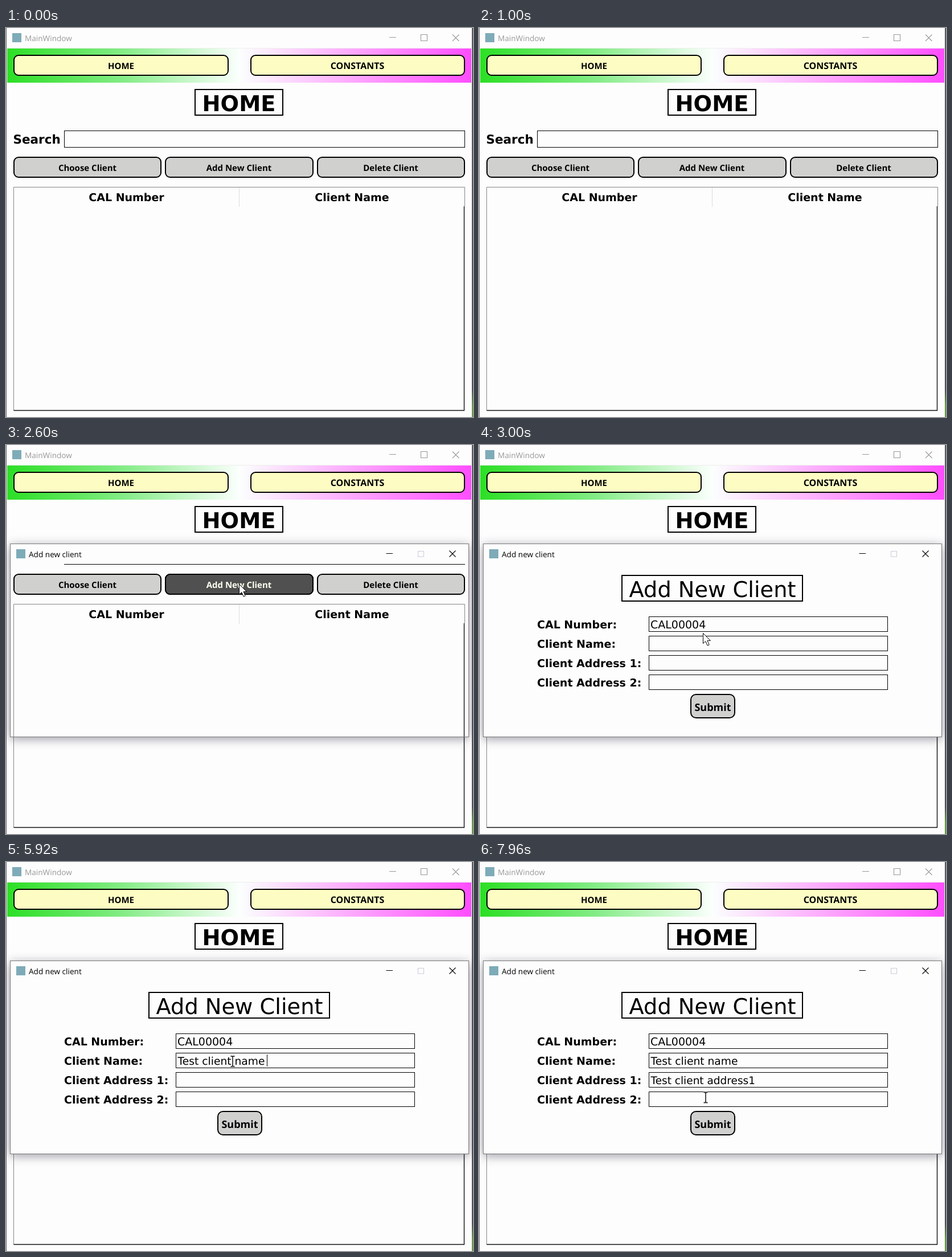
Recreate the animation shown at these times as an HTML page. Size 820 px wide and 683 px high, loop 8000 ms.

```html
<!DOCTYPE html>
<html lang="en">
<head>
<meta charset="utf-8">
<title>Add new client</title>
<style>
html, body { margin: 0; width: 100%; height: 100%; overflow: hidden; background: #fdfdfd; }
svg { display: block; width: 820px; height: 683px; }
text { font-family: "DejaVu Sans", Verdana, sans-serif; text-rendering: geometricPrecision; white-space: pre; }
.mid { text-anchor: middle; }
.title { font: 13.6px "Open Sans", sans-serif; }
.h1 { font-size: 38.3px; }
.bold { font-weight: 700; font-size: 19px; }
.value { font-size: 18.7px; }
.hand { font: 700 15px "Noto Sans", "Open Sans", sans-serif; text-anchor: middle; }
.box { fill: none; stroke: #000; }
.thick { stroke: #000; stroke-width: 2; }
.nav { fill: #fcfcc3; }
.grey { fill: #d0d0cf; }
.line { fill: none; stroke-width: 1.1; }

/* timed parts share one 8 s loop */
.t { animation: 8s step-end infinite; }
.hover { animation-name: hover; }
.dialog { animation-name: dialog; animation-timing-function: ease-out; transform-origin: 410px 343px; }
.form { animation-name: form; }
.name { animation-name: name; }
.addr { animation-name: addr; }
.arrow { animation-name: arrow; }
.beam { animation-name: beam; }
.arrow-path { animation-name: arrow-path; animation-timing-function: ease-in-out; }
.beam-path { animation-name: beam-path; animation-timing-function: ease-in-out; }
.caret { stroke: #000; animation-name: var(--k); }

@keyframes hover { 0% { opacity: 0 } 29.5%, 100% { opacity: 1 } }
@keyframes dialog {
  0%, 30.5% { opacity: 0; transform: scale(.93) }
  32.4%, 100% { opacity: 1; transform: none }
}
@keyframes form { 0% { opacity: 0 } 33%, 100% { opacity: 1 } }
@keyframes name { 0% { opacity: 0 } 73%, 100% { opacity: 1 } }
@keyframes addr { 0% { opacity: 0 } 90%, 100% { opacity: 1 } }
@keyframes arrow { 0% { opacity: 0 } 27.5% { opacity: 1 } 65%, 100% { opacity: 0 } }
@keyframes beam { 0% { opacity: 0 } 65%, 100% { opacity: 1 } }
@keyframes arrow-path {
  0%, 27.3% { transform: translate(436px, 690px) }
  30%, 36.3% { transform: translate(409px, 244px) }
  37.5%, 63% { transform: translate(393px, 330px) }
  65%, 100% { transform: translate(396px, 336px) }
}
@keyframes beam-path {
  0%, 65% { transform: translate(398px, 341px) }
  69%, 76.3% { transform: translate(398px, 350px) }
  85.5%, 92.5% { transform: translate(398px, 386.5px) }
  97.5% { transform: translate(398px, 406.5px) }
  99.5%, 100% { transform: translate(398px, 413.5px) }
}
@keyframes name-start { 0% { opacity: 0 } 71.5% { opacity: 1 } 73%, 100% { opacity: 0 } }
@keyframes name-end { 0% { opacity: 0 } 73% { opacity: 1 } 80%, 100% { opacity: 0 } }
@keyframes addr-start { 0% { opacity: 0 } 88% { opacity: 1 } 90%, 100% { opacity: 0 } }
@keyframes addr-end { 0% { opacity: 0 } 90% { opacity: 1 } 96.5%, 100% { opacity: 0 } }
</style>
</head>
<body>
<svg viewBox="0 0 820 683" xmlns="http://www.w3.org/2000/svg">
  <defs>
    <linearGradient id="bar">
      <stop offset="0" stop-color="#2cdf25"/>
      <stop offset=".25" stop-color="#84ec86"/>
      <stop offset=".5" stop-color="#fbfffd"/>
      <stop offset="1" stop-color="#ff4dff"/>
    </linearGradient>
    <linearGradient id="edge" x2="0" y2="1">
      <stop offset="0" stop-color="#55555c"/>
      <stop offset=".93" stop-color="#4a4a55"/>
      <stop offset=".97" stop-color="#5f9a35"/>
    </linearGradient>
    <filter id="blur" x="-10%" y="-15%" width="120%" height="130%"><feGaussianBlur stdDeviation="9"/></filter>
    <clipPath id="outside"><path clip-rule="evenodd" d="M0 0H820V683H0ZM7 173V512H813V173Z"/></clipPath>
  </defs>

  <!-- main window -->
  <rect width="820" height="683" fill="#fdfdfd"/>
  <rect y="36" x="2" width="815" height="60" fill="url(#bar)"/>
  <path d="M1 35.5H818" stroke="#eee"/>
  <rect width="1" height="683" fill="#66666c"/>
  <rect x="818" width="2" height="683" fill="url(#edge)"/>
  <rect x="11" y="9" width="16" height="16" fill="#7eabb8"/>
  <text class="title" x="33" y="22.5" fill="#999">MainWindow</text>
  <path class="line" stroke="#999" d="M673 16.5H685M728.5 11.5h11v11h-11ZM784 11.5l11.5 11.5M795.5 11.5L784 23"/>

  <g class="thick nav">
    <rect x="14" y="48" width="376" height="35" rx="8"/>
    <rect x="430" y="48" width="375" height="35" rx="8"/>
  </g>
  <text class="hand" x="202" y="71.5">HOME</text>
  <text class="hand" x="617" y="71.5" style="font-size:16px">CONSTANTS</text>

  <rect class="thick" x="332" y="108" width="154" height="45" fill="none"/>
  <text class="h1 mid" x="409" y="146" font-weight="700">HOME</text>

  <text class="bold" x="12.5" y="203" style="font-size:21.5px">Search</text>
  <rect class="box" x="102.5" y="180.5" width="703" height="29"/>

  <g class="thick grey">
    <rect x="14" y="227" width="258" height="35" rx="8"/>
    <rect x="280" y="227" width="259" height="35" rx="8"/>
    <rect x="547" y="227" width="258" height="35" rx="8"/>
  </g>
  <text class="hand" x="143" y="250.5">Choose Client</text>
  <text class="hand" x="409" y="250.5">Add New Client</text>
  <text class="hand" x="675.5" y="250.5">Delete Client</text>
  <g class="t hover">
    <rect class="thick" x="280" y="227" width="259" height="35" rx="8" fill="#505050"/>
    <text class="hand" x="409" y="250.5" fill="#fffff0">Add New Client</text>
  </g>

  <path d="M13.5 671.5V279.5H805.5V313" fill="none" stroke="#858585"/>
  <path d="M409.5 280V314" stroke="#dcdce2"/>
  <path d="M804.5 313V671.5H13.5" fill="none" stroke="#111" stroke-width="1.4"/>
  <text class="bold mid" x="211.5" y="304">CAL Number</text>
  <text class="bold mid" x="607.5" y="304">Client Name</text>

  <!-- dialog: its client area stays see-through until the form is painted -->
  <g class="t dialog">
    <g clip-path="url(#outside)">
      <rect x="7" y="177" width="806" height="339" fill="#34344a" opacity=".5" filter="url(#blur)"/>
    </g>
    <rect x="8" y="174" width="804" height="35" fill="#fdfdfd"/>
    <rect class="t form" x="8" y="208" width="804" height="304" fill="#fdfdfd"/>
    <rect x="7.5" y="173.5" width="805" height="339" fill="none" stroke="#777"/>
    <rect x="18" y="183" width="16" height="16" fill="#7eabb8"/>
    <text class="title" x="40" y="196.5">Add new client</text>
    <path class="line" stroke="#000" d="M667.5 190.5H679M778.5 185.5l11 11M789.5 185.5l-11 11"/>
    <path class="line" stroke="#ccd" d="M723.5 186.5h10v9.5h-10Z"/>

    <g class="t form">
      <rect class="thick" x="251" y="229" width="317" height="45" fill="none"/>
      <text class="h1 mid" x="410" y="267">Add New Client</text>
      <text class="bold" x="102" y="322">CAL Number:</text>
      <text class="bold" x="102" y="356">Client Name:</text>
      <text class="bold" x="102" y="390">Client Address 1:</text>
      <text class="bold" x="102" y="424">Client Address 2:</text>
      <g class="box">
        <rect x="298.5" y="301.5" width="419" height="26"/>
        <rect x="298.5" y="335.5" width="419" height="26"/>
        <rect x="298.5" y="369.5" width="419" height="26"/>
        <rect x="298.5" y="403.5" width="419" height="26"/>
      </g>
      <text class="value" x="301" y="322" style="font-size:19px">CAL00004</text>
      <text class="value t name" x="301.5" y="356">Test client name</text>
      <text class="value t addr" x="301.5" y="390" style="font-size:18.5px">Test client address1</text>
      <path class="t caret" style="--k:name-start" d="M301.5 338V359"/>
      <path class="t caret" style="--k:name-end" d="M458.5 338V359"/>
      <path class="t caret" style="--k:addr-start" d="M301.5 372V393"/>
      <path class="t caret" style="--k:addr-end" d="M489.5 372V393"/>
      <rect class="thick grey" x="372" y="438" width="77" height="41" rx="9"/>
      <text class="hand" x="410.5" y="467" style="font-size:18px">Submit</text>
    </g>
  </g>

  <!-- pointers -->
  <g class="t arrow"><g class="t arrow-path">
    <path d="M.5 .5V18.5L4.8 14.6 8.2 22.2 11.2 20.9 8 13.4H13.4Z" fill="#fff" stroke="#000"/>
  </g></g>
  <g class="t beam"><g class="t beam-path" fill="none">
    <path d="M0 -9V9M-3.5 -9H3.5M-3.5 9H3.5" stroke="#fff" stroke-width="3"/>
    <path d="M-3.5 -9H-1L0 -8 1 -9H3.5M0 -8V8M-3.5 9H-1L0 8 1 9H3.5" stroke="#000" stroke-width="1.4"/>
  </g></g>
</svg>
</body>
</html>
```
